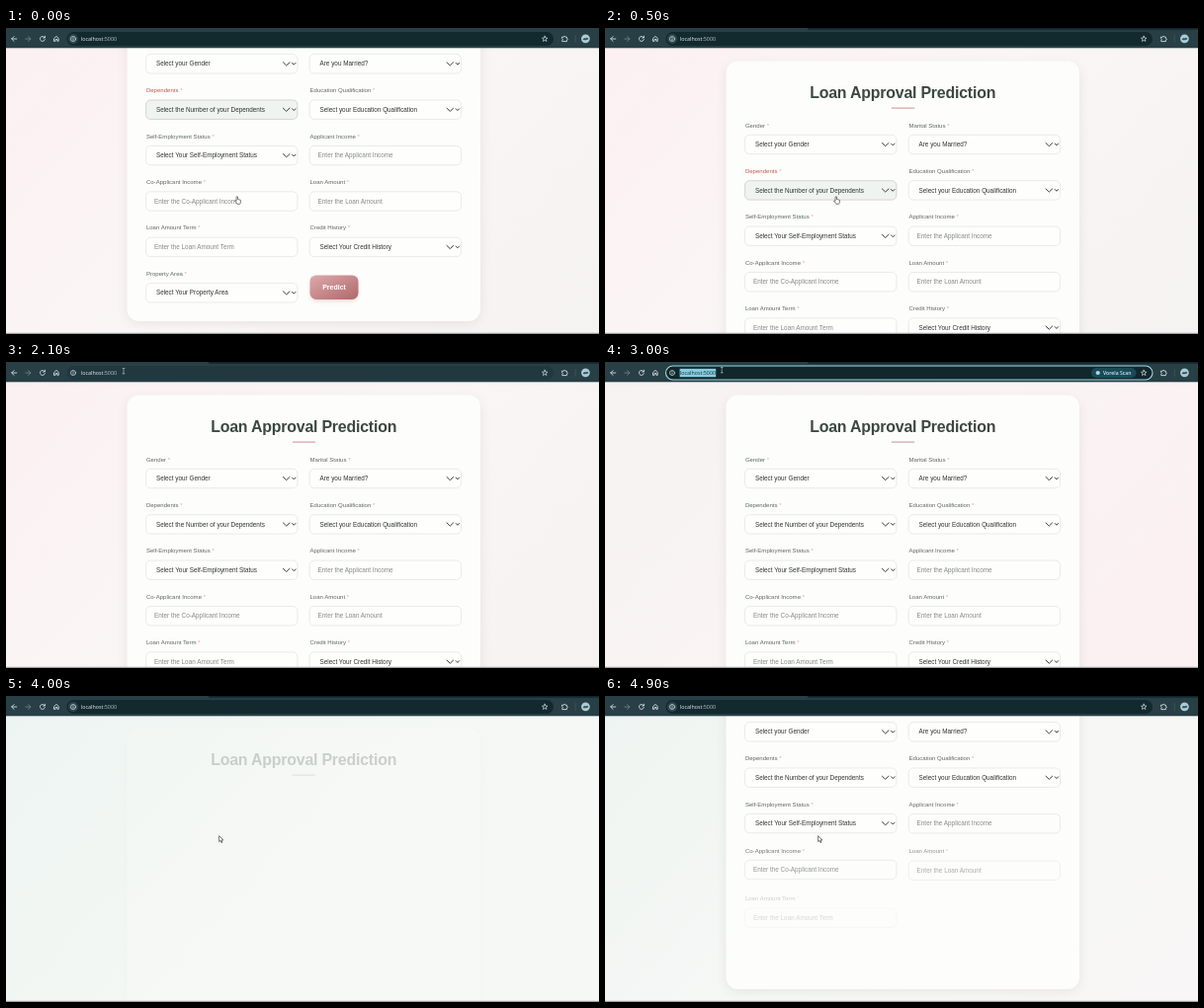
Animation of 600 by 310 pixels, one loop 5000 ms. Source, as an HTML page:

```html
<!DOCTYPE html>
<html lang="en">
<head>
<meta charset="utf-8">
<title>Loan form</title>
<style>
  html, body { margin: 0; width: 100%; height: 100%; overflow: hidden; background: #fff; }
  svg { display: block; width: 600px; height: 310px; }
  text { font-family: "Liberation Sans", Arial, sans-serif; white-space: pre; }
  .ui { font-family: "Open Sans", "Noto Sans", sans-serif; font-size: 5.35px; }
  .label { font-size: 6.05px; }
  .value { font-size: 6.37px; fill: #303532; }
  .hint { fill: #858a87; }
  .line { fill: none; stroke-linecap: round; stroke-linejoin: round; }
</style>
</head>
<body>
<svg viewBox="0 0 600 310">
  <defs>
    <linearGradient id="sky" gradientUnits="userSpaceOnUse" x1="60" y1="-60" x2="540" y2="370">
      <stop/><stop offset=".5"/><stop offset="1"/>
    </linearGradient>
    <linearGradient id="rose" x2="1" y2="1">
      <stop stop-color="#dcaaac"/><stop offset="1" stop-color="#b1676a"/>
    </linearGradient>
    <filter id="soft" x="-20%" y="-20%" width="140%" height="140%"><feGaussianBlur stdDeviation="6"/></filter>
    <filter id="soft2" x="-30%" y="-50%" width="160%" height="200%"><feGaussianBlur stdDeviation="2"/></filter>
    <clipPath id="view"><rect y="20" width="600" height="289"/></clipPath>
  </defs>

  <rect width="600" height="310" fill="url(#sky)"/>
  <g clip-path="url(#view)">
    <g id="page">
      <g id="card">
        <rect x="122.5" y="38" width="357.5" height="343" rx="12" fill="#5a4a4a" opacity=".1" filter="url(#soft)"/>
        <rect x="122.5" y="33.5" width="357.5" height="345.3" rx="12" fill="#fdfdfb"/>
        <text x="301.2" y="70.7" text-anchor="middle" font-size="15.9" font-weight="700"
              letter-spacing="-.2" fill="#3c4842">Loan Approval Prediction</text>
        <rect x="289.7" y="80.4" width="23.6" height="1.3" rx=".6" fill="#d3a6a6"/>
        <g id="fields"></g>
      </g>
    </g>
  </g>
  <rect y="308.8" width="600" height="1.2" fill="#a2a2a4"/>

  <g id="toolbar">
    <rect width="600" height="20.3" fill="#273f45"/>
    <rect id="strip" x="205" width="395" height="1.6" fill="#10262b"/>
    <rect id="bar" x="61.5" y="4" width="492.5" height="14" rx="7" stroke-width="1.1"/>
    <g class="line" stroke="#dbe6e8" stroke-width=".85">
      <path d="M10.8 11H5.8M8.1 8.6L5.7 11L8.1 13.4"/>
      <path d="M19.8 11H24.8M22.5 8.6L24.9 11L22.5 13.4" stroke="#71868b"/>
      <path id="reload" d="M39.1 9.6A2.5 2.5 0 1 0 39.4 11.6M39.4 8.2V10H37.6"/>
      <path id="stop" d="M34.8 8.8L39.2 13.2M39.2 8.8L34.8 13.2"/>
      <path d="M48.8 10.4L51 8.4L53.2 10.4V13.3H51.9V11.5H50.1V13.3H48.8Z"/>
      <circle id="siteBack" cx="68" cy="11" r="5" fill="#2c474d" stroke="none"/>
      <circle cx="68" cy="11" r="2.5" stroke-width=".7"/>
      <path d="M68 10.8V12.2M68 9.7V9.8" stroke-width=".7"/>
      <path id="star" stroke-width=".7"/>
      <path d="M562.8 9.2H564.3A.9 .9 0 0 1 566.1 9.2H567.4V10.5A.9 .9 0 0 1 567.4 12.3V13.6H562.8V12.2A.9 .9 0 0 0 562.8 10.6Z"/>
      <path d="M576.2 7.5V14.5" stroke="#496268" stroke-width=".6"/>
    </g>
    <circle cx="586.4" cy="10.8" r="4.4" fill="#a9cbd6"/>
    <path d="M583.6 11.7Q585 9.2 586.6 10.4Q588.4 8.8 589.3 11.2Q586.5 13.2 583.6 11.7" fill="#38535e"/>
    <rect id="selection" x="75.6" y="6.8" width="36.6" height="8.4" fill="#86cee0"/>
    <text class="ui" x="76" y="12.9"><tspan id="host">localhost</tspan><tspan id="port">:5000</tspan></text>
    <g id="chip">
      <rect x="492" y="6" width="45.5" height="10" rx="5" fill="#1b4a55"/>
      <circle cx="498.7" cy="11" r="2.1" fill="#a4dcea"/>
      <text class="ui" x="504" y="12.9" font-weight="600" style="font-size:5.1px" fill="#c9eaf2">Vorela Scan</text>
    </g>
  </g>

  <g id="cursor">
    <path id="arrow" d="M0 0V6L1.4 4.8L2.4 7L3.3 6.6L2.4 4.4H4.2Z" fill="#fff" stroke="#222" stroke-width=".6"/>
    <path id="hand" d="M-.7 .5Q0 -.4 .7 .5V3Q1.3 2.5 1.8 3.2Q2.4 2.8 2.8 3.5Q3.5 3.2 3.6 4.1V6Q3.5 7 2.9 7.7H.2Q-.8 6.2 -2.2 4.8Q-2 3.9 -.7 4.7Z"
          fill="#fff" stroke="#222" stroke-width=".6"/>
    <path id="beam" class="line" d="M-.9 -2.6H.9M0 -2.6V2.8M-.9 2.8H.9" stroke="#c3cfd1" stroke-width=".6"/>
  </g>
</svg>
<script>
const LOOP = 5000, ROW = 46.4, SCROLLED = 81.7;
const LOAD = 3800, CARD_IN = 3900, FIELDS_IN = 4000;
const $ = id => document.getElementById(id);

// Label, content, and whether the field is a dropdown
const FORM = [
  ["Gender", "Select your Gender", 1],
  ["Marital Status", "Are you Married?", 1],
  ["Dependents", "Select the Number of your Dependents", 1],
  ["Education Qualification", "Select your Education Qualification", 1],
  ["Self-Employment Status", "Select Your Self-Employment Status", 1],
  ["Applicant Income", "Enter the Applicant Income", 0],
  ["Co-Applicant Income", "Enter the Co-Applicant Income", 0],
  ["Loan Amount", "Enter the Loan Amount", 0],
  ["Loan Amount Term", "Enter the Loan Amount Term", 0],
  ["Credit History", "Select Your Credit History", 1],
  ["Property Area", "Select Your Property Area", 1],
];

function fieldMarkup([label, value, dropdown], i) {
  const x = i % 2 ? 307.2 : 141.6, y = 118 + ROW * (i >> 1);
  const chevrons = `<path class="line" stroke="#3a3f3c" d="M${x + 138.8} ${y - 1.5}l3.3 3.2l3.3 -3.2m2.6 .6l1.7 1.8l1.7 -1.8"/>`;
  return `<g>
    <text class="label" x="${x + .3}" y="${y - 17.4}">${label} <tspan fill="#dfa29c">*</tspan></text>
    <rect x="${x}" y="${y - 9.7}" width="153.3" height="19.4" rx="4.6" stroke-width=".7"/>
    <text class="value ${dropdown ? "" : "hint"}" x="${x + (dropdown ? 10.3 : 8.4)}" y="${y + 2.2}">${value}</text>
    ${dropdown ? chevrons : ""}
  </g>`;
}

const buttonMarkup = `<g>
  <rect x="308.5" y="335" width="47" height="23" rx="6" fill="#b1676a" opacity=".3" filter="url(#soft2)"/>
  <rect x="307.5" y="332.2" width="49" height="24.4" rx="6.4" fill="url(#rose)"/>
  <text x="332" y="346.9" text-anchor="middle" font-size="7" font-weight="700" fill="#fff">Predict</text>
</g>`;

$("fields").innerHTML = FORM.map(fieldMarkup).join("") + buttonMarkup;
const fields = [...$("fields").children];
const stops = document.querySelectorAll("#sky stop");

$("star").setAttribute("d", "M" + Array.from({ length: 10 }, (_, k) => {
  const r = k % 2 ? 1.3 : 2.9, a = k * Math.PI / 5;
  return `${545.2 + r * Math.sin(a)} ${11.1 - r * Math.cos(a)}`;
}).join("L") + "Z");

const ramp = (t, a, b) => Math.min(1, Math.max(0, (t - a) / (b - a)));
const smooth = p => p * p * (3 - 2 * p);
const mix = (a, b, p) => a + (b - a) * p;
const mixColor = (a, b, p) => `rgb(${a.map((v, i) => Math.round(mix(v, b[i], p)))})`;
const show = (id, on) => $(id).style.display = on ? "" : "none";

// The CSS "ease" curve
function ease(p) {
  let lo = 0, hi = 1;
  for (let i = 0; i < 20; i++) {
    const u = (lo + hi) / 2, v = 1 - u;
    if (.75 * u * v + u ** 3 < p) lo = u; else hi = u;
  }
  const v = 1 - lo;
  return .3 * lo * v * v + 3 * lo * lo * v + lo ** 3;
}

const ROSY = [[252, 240, 242], [250, 246, 246], [245, 242, 242]];
const GREY = [[247, 242, 242], [250, 244, 244], [251, 240, 241]];
const MINT = [[237, 244, 241], [244, 248, 245], [246, 248, 246]];
const DAWN = [[238, 244, 241], [246, 248, 246], [248, 246, 246]];

function drawBackground(t) {
  const [from, to, p] = t < LOAD ? [ROSY, GREY, ramp(t, 1900, 3000)] : [MINT, DAWN, ramp(t, 4000, 4900)];
  stops.forEach((s, i) => s.setAttribute("stop-color", mixColor(from[i], to[i], p)));
}

// Start time, end time, destination
const MOVES = [[700, 1200, 188.3, 117], [1650, 2050, 119, 9], [2600, 2900, 118.2, 8], [3620, 3900, 215.6, 141.6]];

function drawCursor(t) {
  let x = 233.8, y = 170.6;
  for (const [a, b, toX, toY] of MOVES) {
    const p = smooth(ramp(t, a, b));
    x = mix(x, toX, p);
    y = mix(y, toY, p);
  }
  const inBar = y < 18;
  const onDropdown = t < 2000 && (y > 154 || (y > 108 && y < 128));
  $("cursor").setAttribute("transform", `translate(${x} ${y})`);
  show("beam", inBar);
  show("hand", onDropdown);
  show("arrow", !inBar && !onDropdown);
  return inBar;
}

function drawToolbar(t, hover) {
  const focus = t >= 2400 && t < 3100, loading = t >= 3100 && t < 3500;
  $("bar").setAttribute("fill", focus ? "#11272c" : hover ? "#20383e" : "#12292e");
  $("bar").setAttribute("stroke", focus ? "#9fd9e6" : "none");
  show("siteBack", !focus && !hover);
  show("selection", focus);
  show("chip", t >= 2500 && t < 3100);
  show("stop", loading);
  show("reload", !loading);
  show("strip", t >= 100);
  $("host").setAttribute("fill", focus ? "#14333b" : "#edf3f4");
  $("port").setAttribute("fill", focus ? "#14333b" : "#b4c3c6");
}

function drawField(g, i, t) {
  const p = t < LOAD ? 1 : ease(ramp(t, FIELDS_IN + 100 * i, FIELDS_IN + 100 * i + 500));
  g.setAttribute("opacity", p);
  g.setAttribute("transform", `translate(0 ${4 * (1 - p)})`);
  if (i >= FORM.length) return;
  const genderHover = i === 0 ? ramp(t, 1000, 1250) - ramp(t, 1750, 1950) : 0;
  const active = i === 2 ? 1 - ramp(t, 800, 1050) : 0;
  const [label, box] = g.children;
  label.setAttribute("fill", mixColor([91, 106, 99], [194, 88, 82], Math.max(active, .65 * genderHover)));
  box.setAttribute("fill", mixColor([254, 254, 253], [240, 244, 241], active));
  box.setAttribute("stroke", mixColor([224, 228, 225], [203, 196, 193], active));
}

function draw(t) {
  const scroll = t < 2000 ? 1 - smooth(ramp(t, 50, 450)) : smooth(ramp(t, 4020, 4200));
  const cardIn = t < LOAD ? 1 : ease(ramp(t, CARD_IN, CARD_IN + 600));
  drawBackground(t);
  $("page").setAttribute("transform", `translate(0 ${-SCROLLED * scroll})`);
  $("card").setAttribute("opacity", cardIn);
  $("card").setAttribute("transform", `translate(0 ${cardIn - 1})`);
  fields.forEach((g, i) => drawField(g, i, t));
  drawToolbar(t, drawCursor(t));
}

const start = performance.now();
function frame() {
  draw((performance.now() - start) % LOOP);
  requestAnimationFrame(frame);
}
frame();
</script>
</body>
</html>
```
